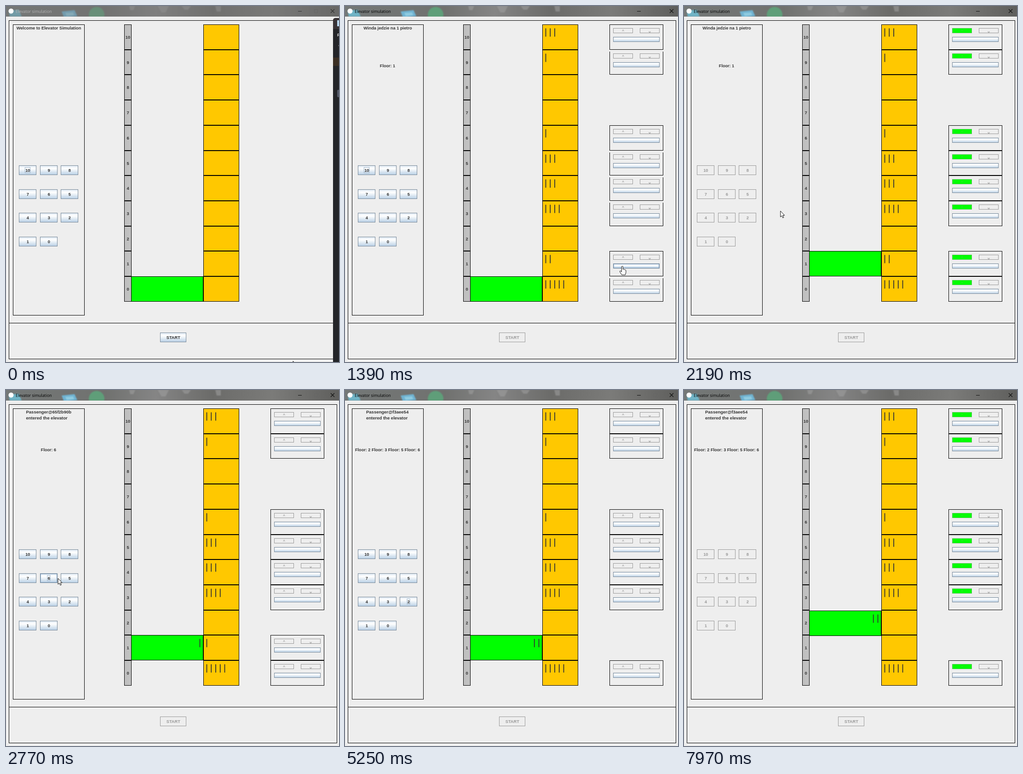
These frames come from a looping animation (724 by 773 pixels, 8000 ms). An HTML page:

```html
<!DOCTYPE html>
<html lang="en">
<head>
<meta charset="utf-8">
<title>Elevator simulation</title>
<style>
  html, body { margin: 0; width: 100%; height: 100%; overflow: hidden; background: #eee; }
  svg { display: block; width: 724px; height: 773px; }
  text { font: bold 9.25px "Liberation Sans", Arial, sans-serif; fill: #333; }
  .mid { text-anchor: middle; }
  .off { fill: #999; }
  .title { font: 8.8px "Open Sans", "Noto Sans", sans-serif; }
  .caret { font-size: 8px; }
</style>
</head>
<body>
<svg viewBox="0 0 724 773">
  <defs>
    <linearGradient id="metal" x2="0" y2="1">
      <stop offset="0" stop-color="#dde8f3"/><stop offset=".3" stop-color="#fff"/>
      <stop offset=".5" stop-color="#edf3f8"/><stop offset="1" stop-color="#b8cfe5"/>
    </linearGradient>
    <linearGradient id="bar">
      <stop offset="0" stop-color="#747877"/><stop offset=".3" stop-color="#70716f"/>
      <stop offset=".45" stop-color="#858585"/><stop offset=".62" stop-color="#6b6b69"/>
      <stop offset=".8" stop-color="#7b7b79"/><stop offset="1" stop-color="#5f5f5d"/>
    </linearGradient>
    <filter id="soft"><feGaussianBlur stdDeviation="1.3"/></filter>
    <clipPath id="barClip"><path d="M0 0H724V23H0z"/></clipPath>
  </defs>
  <g id="fixed"></g>
  <g id="live"></g>
</svg>
<script>
const LOOP = 8000, STEP = 65.8;
const LIFT_SPEED = 0.078;            // px per ms
const START = 440, RIDE_1 = 1469, ARRIVE = 2174, RIDE_2 = 7283;
const ENTER_1 = 2620, ENTER_2 = 3010;
const WAITING = { 10: 3, 9: 1, 6: 1, 5: 3, 4: 3, 3: 4, 1: 2, 0: 5 };

// time, x, y of the pointer tip
const POINTER = [
  [0, 624, 771], [70, 600, 765], [200, 470, 736], [330, 378, 721], [470, 378, 720],
  [600, 455, 645], [724, 536, 564], [860, 598, 563], [1300, 606, 565], [1711, 590, 564],
  [1777, 430, 552], [2100, 240, 455], [2430, 100, 409], [2640, 97, 408], [2763, 113, 409],
  [2900, 136, 410], [3040, 136, 411], [3230, 98, 458], [3420, 96, 461], [3700, 134, 462],
  [4014, 145, 468], [4240, 143, 555], [4540, 340, 597], [4870, 596, 619], [5000, 640, 619],
  [5066, 660, 618], [5132, 707, 606]
];
// time, focused keypad button
const FOCUS = [[0, 10], [RIDE_1, null], [ENTER_1, 6], [ENTER_2, 5], [3360, 3], [3860, 2], [RIDE_2, null]];
const HOVER = [[2400, 2800, 6], [2850, 3100, 5], [3210, 3480, 3], [3650, 4110, 2]];
const MESSAGE = [
  [0, ["Welcome to Elevator Simulation"]],
  [1100, ["Winda jedzie na 1 pietro"]],
  [ENTER_1, ["Passenger@65f2b90b", "entered the elevator"], 43.5],
  [ENTER_2, ["Passenger@f3aee54", "entered the elevator"], 46]
];
const STOPS = [
  [0, []], [1100, [1]], [ARRIVE, []], [ENTER_1, [6]], [ENTER_2, [5, 6]],
  [3360, [3, 5, 6]], [3860, [2, 3, 5, 6]]
];

const within = (t, from, to) => t >= from && t < to;
const latest = (table, t) => table.filter(row => row[0] <= t).pop();
const floorTop = n => Math.round(40 + (10 - n) * 54.7);
const floorHeight = n => (n ? floorTop(n - 1) : 642) - floorTop(n);
const box = (x, y, w, h, fill = "none", stroke = "#000") =>
  `<rect x="${x + .5}" y="${y + .5}" width="${w - 1}" height="${h - 1}" fill="${fill}" stroke="${stroke}"/>`;
const label = (x, y, s, cls = "mid", extra = "") => `<text x="${x}" y="${y}" class="${cls}" ${extra}>${s}</text>`;
const line = (d, stroke = "#000", width = 1) => `<path d="${d}" fill="none" stroke="${stroke}" stroke-width="${width}"/>`;

function button(x, y, w, h, { text = "", enabled = true, hover = false, focus = false } = {}) {
  const face = enabled ? box(x, y, w, h, "url(#metal)", "#7a8a99") : box(x, y, w, h, "none", "#999");
  const half = text.length * 2.6 + 1;
  return face
    + (hover ? box(x + 1, y + 1, w - 2, h - 2, "none", "#8fb0d0") : "")
    + (focus ? box(x + w / 2 - half, y + 4, half * 2, 13, "none", "#a3b8cc") : "")
    + (text && label(x + w / 2 + .3, y + h / 2 + 3.6, text, enabled ? "mid" : "mid off"));
}

function people(count, x, y, gap) {
  let d = "";
  for (let i = 0; i < count; i++) d += `M${x + i * gap} ${y}v18`;
  return line(d, "#333", 1.8);
}

function callPanel(n, t, lit) {
  const y = floorTop(n), h = floorHeight(n);
  const open = t < RIDE_1 && n < 10 && WAITING[n + 1];
  const hover = n === 1 && within(t, 840, 1760) || n === 0 && within(t, 4860, 5110);
  return (open ? line(`M575.5 ${y + 4}V${y + h - .5}H691.5V${y + 4}`) : box(575, y, 117, h))
    + box(583, y + 8, 43, 11, lit ? "#0f0" : "none", lit ? "#5cc45c" : "#999")
    + label(604.5, y + 17, "^", "mid off caret", lit ? 'opacity=".35"' : "")
    + box(641, y + 8, 43, 11, "none", "#999")
    + label(662.5, y + 18.5, "v", "mid off caret")
    + button(583, y + 27, 101, 11, { hover });
}

function keypad(t) {
  const enabled = !within(t, RIDE_1, ARRIVE) && t < RIDE_2;
  const focused = latest(FOCUS, t)[1];
  let out = "";
  for (let n = 10; n >= 0; n--) {
    const i = 10 - n;
    const hover = HOVER.some(([from, to, key]) => key === n && within(t, from, to));
    out += button(28 + Math.round(i % 3 * 45.5), 346 + Math.round(Math.floor(i / 3) * 51.6), 38, 21,
      { text: String(n), enabled, hover, focus: focused === n });
  }
  return out;
}

function messages(t) {
  const [, lines, left] = latest(MESSAGE, t);
  const stops = latest(STOPS, t)[1].map(n => "Floor: " + n).join(" ");
  return lines.map((s, i) => left
    ? label(left, 51 + i * 12.5, s, "", 'style="font-size:9.5px"')
    : label(93, 51, s)).join("") + label(92.5, 133, stops, "mid", 'style="font-size:9.1px"');
}

function liftTop(t) {
  const climb = t < RIDE_2
    ? Math.min(55, Math.max(0, (t - RIDE_1) * LIFT_SPEED))
    : 55 + Math.min(54, (t - RIDE_2) * LIFT_SPEED);
  return Math.round(587 - climb);
}

function pointer(t) {
  if (t >= 5190) return "";
  const k = POINTER.findIndex(p => p[0] > t);
  const a = POINTER[k < 0 ? POINTER.length - 1 : k - 1], b = k < 0 ? a : POINTER[k];
  const u = a === b ? 0 : (t - a[0]) / (b[0] - a[0]);
  const x = a[1] + (b[1] - a[1]) * u, y = a[2] + (b[2] - a[2]) * u;
  const hand = within(t, 840, 1800) || within(t, 4860, 5110);
  const shape = hand
    ? "M-1.5 1Q0-1 1.5 1V7Q3 6 4 7.5Q5.500 6.500 6.500 8.300Q8 8 8 10V14L6.500 19H-1L-5.500 12Q-5.500 10-3.500 10.500L-1.500 12.500Z"
    : "M0 0V13L3 10.300L5 15L7.200 14L5.200 9.500H9Z";
  return `<path transform="translate(${x} ${y})" d="${shape}" fill="#fff" stroke="#111" stroke-linejoin="round"/>`;
}

function titleBar(active) {
  const ink = active ? "#111" : "#333";
  return (active ? "" : '<path d="M0 0H724V23H0z" fill="#777" opacity=".4"/>')
    + '<circle cx="11" cy="11" r="5.5" fill="#fff"/>'
    + label(21, 15, "Elevator simulation", "title", `style="fill:${active ? "#000" : "#b4b4b4"}"`)
    + line("M635 11.5h8", ink) + box(670, 7, 8, 8, "none", "#666")
    + line("M706 7l8 8m0-8l-8 8", ink, 1.1);
}

function neighbourWindow() {
  return '<path d="M724 26H717Q711 26 711 32V773H724z" fill="#242529"/>'
    + '<path d="M724 26H717Q711 26 711 32V50H724z" fill="#393336"/>'
    + '<path d="M711 112h13v18h-13z" fill="#3b2f24"/><path d="M724 182h-2q-2 0-2 2v12q0 2 2 2h2z" fill="#535866"/>'
    + '<path d="M720 31h4v13h-4z" fill="#b9d7ee"/>'
    + label(720, 66, "F", "", 'style="fill:#ddd"') + '<circle cx="723.500" cy="86" r=".8" fill="#bbb"/>';
}

function fixedParts() {
  let out = '<path d="M0 0H724V773H0z" fill="#eee"/><g clip-path="url(#barClip)">'
    + '<path d="M0 0H724V23H0z" fill="url(#bar)"/><g filter="url(#soft)">'
    + '<path d="M6 10L28 8L34 23H8z" fill="#70b4c6"/>'
    + '<path d="M121 12L149 9L155 22L126 25z" fill="#6fb3d2"/><path d="M129 15l17-1 2 6-16 2z" fill="#8fcbe0"/>'
    + '<circle cx="197" cy="19" r="17" fill="#5f9e79"/>'
    + '<path d="M268 0h13l-4 9h-7zM330 0h24l-7 14h-9zM382 0h20l-6 8h-8zM455 0h12v12h-9z" fill="#a0a0a0" opacity=".55"/>'
    + '</g></g>'
    + box(6, 31, 714, 658) + box(6, 688, 714, 79) + line("M6 688.500H720") + box(15, 40, 156, 632);
  for (let n = 0; n <= 10; n++) {
    const y = floorTop(n), h = floorHeight(n);
    out += box(257, y, 16, h, "#c0c0c0") + label(265, y + 31, n) + box(429, y, 78, h, "#ffc800");
  }
  return out;
}

function scene(t) {
  const started = t >= START;
  const lit = within(t, RIDE_1, ARRIVE) || t >= RIDE_2;
  const groundLit = lit || within(t, 1400, RIDE_1) || t >= 7230;
  const aboard = (t >= ENTER_1) + (t >= ENTER_2);
  const top = liftTop(t);
  let out = titleBar(started) + messages(t) + keypad(t)
    + button(335, 709, 57, 21, { text: "START", enabled: !started, hover: within(t, 320, START) });
  if (started) {
    for (const key in WAITING) {
      const n = +key, left = WAITING[n] - (n === 1 ? aboard : 0);
      if (left) out += people(left, 436.5, floorTop(n) + 8.5, 9.75) + callPanel(n, t, n ? lit : groundLit);
    }
  }
  out += box(272, top, 157, 55, "#0f0") + people(aboard, 421.5, top + 8.5, -9.75);
  return out + (started ? "" : neighbourWindow()) + pointer(t);
}

const live = document.getElementById("live");
document.getElementById("fixed").innerHTML = fixedParts();
const origin = performance.now();
let shown = -1;

function tick() {
  const step = Math.floor((performance.now() - origin) % LOOP / STEP);
  if (step !== shown) {
    shown = step;
    live.innerHTML = scene(step * STEP);
  }
  requestAnimationFrame(tick);
}
tick();
</script>
</body>
</html>
```
